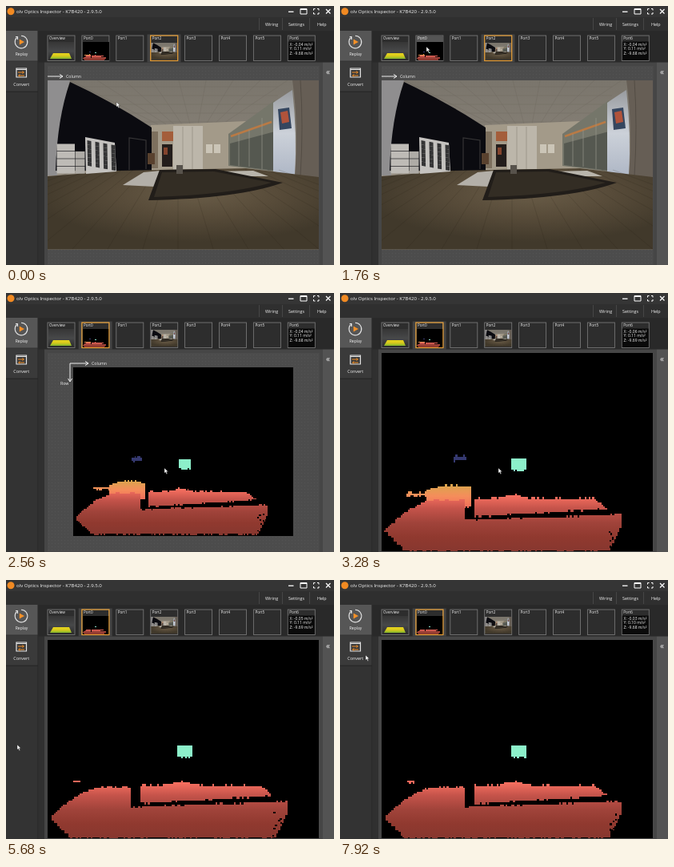
An HTML page that plays this animation: 410x324 px, repeating every 8000 ms.

```html
<!DOCTYPE html>
<html lang="en">
<head>
<meta charset="utf-8">
<title>Sensor replay</title>
<style>
html, body { margin: 0; width: 100%; height: 100%; overflow: hidden; background: #333; }
svg { display: block; width: 100vw; height: 100vh; font-family: "Open Sans", "Noto Sans", sans-serif; fill: #f4f4f4; }
</style>
</head>
<body>
<svg id="stage" viewBox="0 0 410 324" xmlns="http://www.w3.org/2000/svg"></svg>
<script>
const LOOP = 8000, CELL = 2.3, ZOOM = 1.23;
const stage = document.getElementById('stage');
const $ = id => document.getElementById(id);
const repeat = (n, draw) => Array.from({ length: n }, (_, i) => draw(i)).join('');

const rect = (x, y, w, h, fill, more = '') => `<rect x="${x}" y="${y}" width="${w}" height="${h}" fill="${fill}" ${more}/>`;
const shape = (d, fill) => `<path d="${d}" fill="${fill}"/>`;
const line = (d, stroke = '#eee', width = 1) => `<path d="${d}" fill="none" stroke="${stroke}" stroke-width="${width}"/>`;
const text = (x, y, size, str, more = '') => `<text x="${x}" y="${y}" font-size="${size}" ${more}>${str}</text>`;
const grad = (id, colors, more = 'x2="0" y2="1"') => `<linearGradient id="${id}" ${more}>` +
  colors.map((c, i) => `<stop offset="${i / (colors.length - 1)}" stop-color="${c}"/>`).join('') + '</linearGradient>';
const clip = (id, x, y, w, h) => `<clipPath id="${id}">${rect(x, y, w, h, '#000')}</clipPath>`;

function random(seed) {
  let s = seed * 7919 + 13;
  return () => (s = (s * 16807) % 2147483647) / 2147483647;
}

const light = (x, y, w, h) => shape(`M${x - w / 2} ${y - h / 2}h${w * .8}l${w * .2} ${h}h${-w * .8}z`, '#f8f8f2');
const lights = repeat(3, i => light(114 + 28 * i + 12 * i * i, 103 + 14.5 * i, 33, 14 - 3 * i)) +
  light(271, 115, 37, 10) + light(262, 145.5, 25, 4.5) + light(257, 158, 17, 3.5);

const boxes = repeat(4, i => rect(63.5, 172.5 + i * 9.4, 22.5, 8.8, '#bebbb6') +
  (i ? rect(86.5, 172.5 + i * 9.4, 12, 8.8, '#aeaba6') : ''));

const checker = shape('M99 164L136 171L138 207L100 210Z', '#c4c2bf') +
  `<g transform="matrix(5 .9 .1 5.3 101.5 168)">` +
  repeat(42, i => (i + (i / 7 | 0)) % 2 ? '' : rect(i % 7, i / 7 | 0, 1, 1, '#343435')) + '</g>';

const planks = `<g opacity=".3">${repeat(19, i => line(`M${89 + i * 14} 205L${i * 44 - 181} 304`, '#241e14', .5))}</g>`;
const tiles = `<g opacity=".45">${repeat(9, i => line(`M${80 + i * 34} 93L${190 + i * 10} 148`, '#625c52', .5)) +
  repeat(5, i => line(`M90 ${101 + i * 11}H340`, '#625c52', .5))}</g>`;

const photo = `<g id="photo" clip-path="url(#photoClip)">
  ${rect(52, 93, 339, 212, 'url(#ceiling)')}${tiles}
  ${shape('M52 93H80Q66 140 64 212H52Z', '#8f8e8f')}
  ${shape('M181 149L300 144L316 206H181Z', '#a39a89')}
  ${shape('M80 95Q130 118 182 152V206H62Q64 140 80 95', '#0b0b10')}
  ${line('M154 205V165L175 168V204', '#363536', 1.2)}
  ${rect(182, 157, 8, 46, '#7d705e')}${rect(177, 184, 9, 14, '#59412e')}
  ${rect(195, 157, 14, 12, '#a45e3b')}${rect(195, 173, 13, 28, '#231d1b')}${rect(197, 177, 5, 9, '#83442d')}
  ${rect(209, 150, 37, 55, '#bcb6aa')}${line('M221 151V204M233 151V204', '#928d83', .7)}
  ${repeat(2, i => rect(250 + i * 10, 173, 8, 11, '#cbc5b7'))}
  ${shape('M278 160L336 118V207L278 200Z', '#75766a')}
  ${shape('M280 172L336 157V206L280 199Z', '#555850')}
  ${line('M281 163L332 145', '#b97a45', 2.5)}
  ${line('M291 160V200M304 155V201M320 140V204', '#96958a', .7)}
  ${shape('M334 121Q350 110 358 105Q364 160 361 213L334 207Z', 'url(#daylight)')}
  ${shape('M340 129L354 127L357 153L342 155Z', '#35465f')}${shape('M343 133L352 131L354 145L345 147Z', '#b0533b')}
  ${shape('M358 93H391V215L361 213Q366 150 358 93', '#665e55')}${line('M368 93Q372 150 368 213', '#4e4841', .8)}
  ${shape('M52 213L140 206L300 203L391 214V305H52Z', 'url(#floor)')}${planks}
  ${boxes}${checker}
  ${shape('M146 224L172 208L193 206L186 226Z', '#b3afa8')}${shape('M263 207L309 206L328 213L288 213Z', '#b9b5ac')}
  ${shape('M192 205L262 204L346 221Q290 241 178 243Z', '#211d19')}
  ${shape('M195 208L260 207L332 221Q280 236 185 239Z', '#332d24')}
  ${rect(213, 199, 8, 11, '#57524b')}
</g>`;

const depth = `<g id="depth" shape-rendering="crispEdges">
  ${rect(52.4, 65.6, 338.2, 259.5, '#000')}
  <g id="visitor"><path id="mound" fill="url(#warm)"/><path id="far" fill="#353970"/></g>
  <path id="body" fill="url(#red)"/><path id="back" fill="url(#red)"/>
  <path id="chip" fill="#f3685b"/><path id="holes" fill="#000"/><path id="target" fill="#8cf0ca"/>
</g>`;

const names = ['Overview', ...Array.from({ length: 7 }, (_, i) => 'Port' + i)];
const thumbX = i => 52 + i * 42.9;
const thumbs = names.map((n, i) => rect(thumbX(i), 37, 34, 31.5, '#2d2d2d', 'stroke="#757575" stroke-width=".9"')).join('');
const labels = names.map((n, i) => text(thumbX(i) + 2, 42.3, 4.6, n)).join('');

stage.innerHTML = `<defs>
  ${grad('ceiling', ['#7a756c', '#857f75', '#a0978a', '#a0978a'])}
  ${grad('daylight', ['#989b9f', '#ccd1d9', '#aeb6c5'])}
  ${grad('red', ['#fb7262', '#c4534a', '#a0433a', '#90392f', '#87372f'], 'gradientUnits="userSpaceOnUse" x1="0" x2="0" y1="252" y2="323"')}
  ${grad('warm', ['#d8a64c', '#f58d5b', '#f06c5a'])}
  ${grad('overview', ['#e7d51c', '#d7c91e', '#7fb52c'])}
  ${grad('haze', ['#363636', '#474849', '#2a2a2a'])}
  <radialGradient id="floor" cx=".55" cy=".3" r=".6"><stop stop-color="#6a5d48"/><stop offset=".5" stop-color="#574b39"/><stop offset="1" stop-color="#41392b"/></radialGradient>
  ${clip('photoClip', 52, 93, 339, 211.5)}${clip('viewClip', 52, 75, 339.5, 248)}${clip('thumbClip', 95.5, 45, 33.5, 23)}
  <pattern id="dots" width="4" height="4" patternUnits="userSpaceOnUse">${rect(0, 0, 4, 4, '#4c4c4c')}${rect(1, 1, 1, 1, '#545454')}</pattern>
</defs>
${rect(0, 0, 410, 324, '#333')}${rect(0, 0, 410, 14, '#353535')}${rect(0, 14, 410, 17, '#2f2f2f')}
<circle cx="6" cy="6.7" r="4.5" fill="#f18a22"/>
${text(13, 9, 6.1, 'olv Optics Inspector - K7B420 - 2.9.5.0')}
${line('M353 7.2H359.5', '#fff', 1.3)}
${line('M368 3.5H376V10H368ZM368 4.5H376', '#fff')}
${line('M384.5 5.5V3.5H386.5M389 3.5H391V5.5M391 8V10H389M386.5 10H384.5V8', '#fff')}
${line('M400 4L405.5 9.5M405.5 4L400 9.5', '#fff', 1.2)}
${line('M316.5 15V30M345.5 15V30M379.5 15V30', '#464646')}
${text(324, 24.5, 5.4, 'Wiring')}${text(353, 24.5, 5.4, 'Settings')}${text(389, 24.5, 5.4, 'Help')}
${rect(0, 31, 40, 37.5, '#565656')}${rect(0, 69.5, 40, 37, '#3a3a3a')}
${line('M0 107.3H40M40 31V324', '#272727')}
${line('M13.5 39.5A7.8 7.8 0 1 0 19 37.2M12 38.5H14.5V42', '#e4e4e4', 1.1)}
${shape('M16.8 41.5L23 45L16.8 48.5Z', '#f59128')}
${text(19.5, 61.5, 5, 'Replay', 'text-anchor="middle"')}
${line('M13 78H25.5V89H13ZM13 79.5H25.5', '#e4e4e4', 1.2)}
${line('M15 83H22M20.5 81.5L22.5 83L20.5 84.5M23 87H16M17.5 85.5L15.5 87L17.5 88.5', '#f59128')}
${text(19.2, 100, 5.4, 'Convert', 'text-anchor="middle"')}
${rect(40.5, 31, 369.5, 40, '#292929')}
${rect(48, 70.5, 348, 254, '#464646')}${rect(40.5, 70.5, 7.5, 254, '#303030')}
${rect(396, 70.5, 14, 254, '#535353')}${text(400, 85.5, 10, '«')}
<g id="tab">${rect(-4.2, 35.5, 42, 35, '#424242')}</g>
${thumbs}
${rect(53, 45, 32, 23, 'url(#haze)')}${shape('M59 59H79L82 66H55Z', 'url(#overview)')}
<g clip-path="url(#thumbClip)"><use href="#depth" transform="translate(95.5 45) scale(.098 .089) translate(-52.4 -65.6)"/></g>
<use href="#photo" transform="translate(181.2 46) scale(.0985 .1) translate(-52 -93)"/>
${rect(thumbX(7) + .5, 44.5, 33, 23.5, '#0a0a0a')}
<g id="hover">${rect(95.4, 37.4, 33.2, 7.6, '#555')}</g>
<g id="frame">${rect(0, 37, 34, 31.5, 'none', 'stroke="#e59b31" stroke-width="1.2"')}</g>
${labels}
${repeat(3, i => text(354.5, 49.7 + i * 5.7, 5, '', `id="axis${i}"`))}
${rect(52, 75, 339.5, 248.5, 'url(#dots)')}
<g id="cameraView">${photo}${line('M52 88H71M67 85.5L71 88L67 90.5')}${text(75, 90, 5.2, 'Column')}</g>
<g id="depthView">
  <g clip-path="url(#viewClip)"><g id="zoom">${depth}</g></g>
  <g id="axes">${line('M80 111V88H103M99 85.5L103 88L99 90.5M77.5 107L80 111L82.5 107')}
  ${text(107, 90, 5.2, 'Column')}${text(68, 115, 5.2, 'Row')}</g>
</g>
<path id="cursor" d="M0 0V6.3L1.5 5L2.6 7.4L3.7 6.9L2.6 4.6H4.6Z" fill="#fff" stroke="#222" stroke-width=".4"/>`;

// One block per column, like a low-resolution range image.
function band(id, x0, x1, top, bottom, rnd, jitter = 1.6) {
  const snap = v => Math.round((v + (rnd() - .5) * jitter) / CELL) * CELL;
  let d = '';
  for (let x = x0; x < x1; x += CELL) {
    const y = snap(top(x)), h = snap(bottom(x)) - y;
    if (h > 0) d += `M${x.toFixed(1)} ${y.toFixed(1)}h${CELL}v${h.toFixed(1)}h${-CELL}z`;
  }
  $(id).setAttribute('d', d);
}

const bodyTop = x => x < 155 ? 259 + 38 * Math.max(0, (120 - x) / 65) ** 1.8 : 284 - 7 * (x - 155) / 195;
const bodyBottom = x => Math.min(323, 298 + (x - 55), 323 - 2 * (x - 335));
const backTop = x => 257 - 5 * Math.exp(-(((x - 216) / 14) ** 2)) + Math.max(0, x - 318) * .85;
const backBottom = x => 280 - .06 * (x - 166);
const moundTop = x => x < 107 ? 250 : 240 + .007 * (x - 140) ** 2;

function drawDepth(tick) {
  const rnd = random(tick + 3), flat = y => () => y;
  band('body', 55, 350, bodyTop, bodyBottom, rnd);
  band('back', 168, 333, backTop, backBottom, rnd);
  band('mound', 83, 162, moundTop, x => x < 107 ? 254 : 268, rnd);
  band('far', 142, 158, flat(204), flat(210), rnd, 3);
  band('chip', 84, 93, flat(251), flat(254), rnd);
  band('target', 214.3, 231, flat(207), flat(222), rnd, 1.2);
  $('holes').setAttribute('d', repeat(8, () => `M${333 + rnd() * 11} ${285 + rnd() * 34}h${CELL}v${CELL}h${-CELL}z`));
}

// Each move: start, end, destination.
const moves = [[240, 800, 108, 51], [1920, 2480, 198, 219], [5200, 5440, 14, 206], [6900, 7500, 32, 94]];
function cursorAt(t) {
  let x = 138, y = 120;
  for (const [from, to, toX, toY] of moves) {
    const p = Math.min(1, Math.max(0, (t - from) / (to - from))), e = p * p * (3 - 2 * p);
    x += (toX - x) * e;
    y += (toY - y) * e;
  }
  return [x, y];
}

function acceleration(t) {
  const x = -.0455 + .02 * Math.sin((Math.max(t, 2560) - 5900) / 1050);
  return [x, x > -.03 ? .10 : .11, x < -.045 ? -9.69 : -9.68];
}

const show = (id, on) => $(id).setAttribute('visibility', on ? 'inherit' : 'hidden');
const place = (id, x, y = 0) => $(id).setAttribute('transform', `translate(${x.toFixed(2)} ${y.toFixed(2)})`);
let lastTick = -1;

function render(t) {
  const depthOn = t >= 2000;
  const zoom = t < 2880 ? 1 : t < 3120 ? 1.11 : ZOOM;
  $('cameraView').setAttribute('display', depthOn ? 'none' : 'inline');
  show('depthView', depthOn);
  show('visitor', t < 3440);
  show('chip', t >= 3440);
  show('axes', zoom === 1);
  $('zoom').setAttribute('transform', `translate(221.5 212) scale(${zoom / ZOOM}) translate(-221.5 -212)`);
  const selected = thumbX(depthOn ? 1 : 3);
  place('tab', selected);
  place('frame', selected);

  const [x, y] = cursorAt(t);
  place('cursor', x, y);
  show('cursor', t < 3600 || t > 5200);
  show('hover', x > 95 && x < 129 && y > 37 && y < 69);
  acceleration(t).forEach((v, i) => $('axis' + i).textContent = `${'XYZ'[i]}: ${v.toFixed(2)} m/s²`);

  const tick = Math.floor(t / 160);
  if (tick !== lastTick) drawDepth(tick);
  lastTick = tick;
}

// The photo is shared with its thumbnail, so only its parent is switched off.
const start = performance.now();
function loop() {
  render((performance.now() - start) % LOOP);
  requestAnimationFrame(loop);
}
render(0);
requestAnimationFrame(loop);
</script>
</body>
</html>
```
